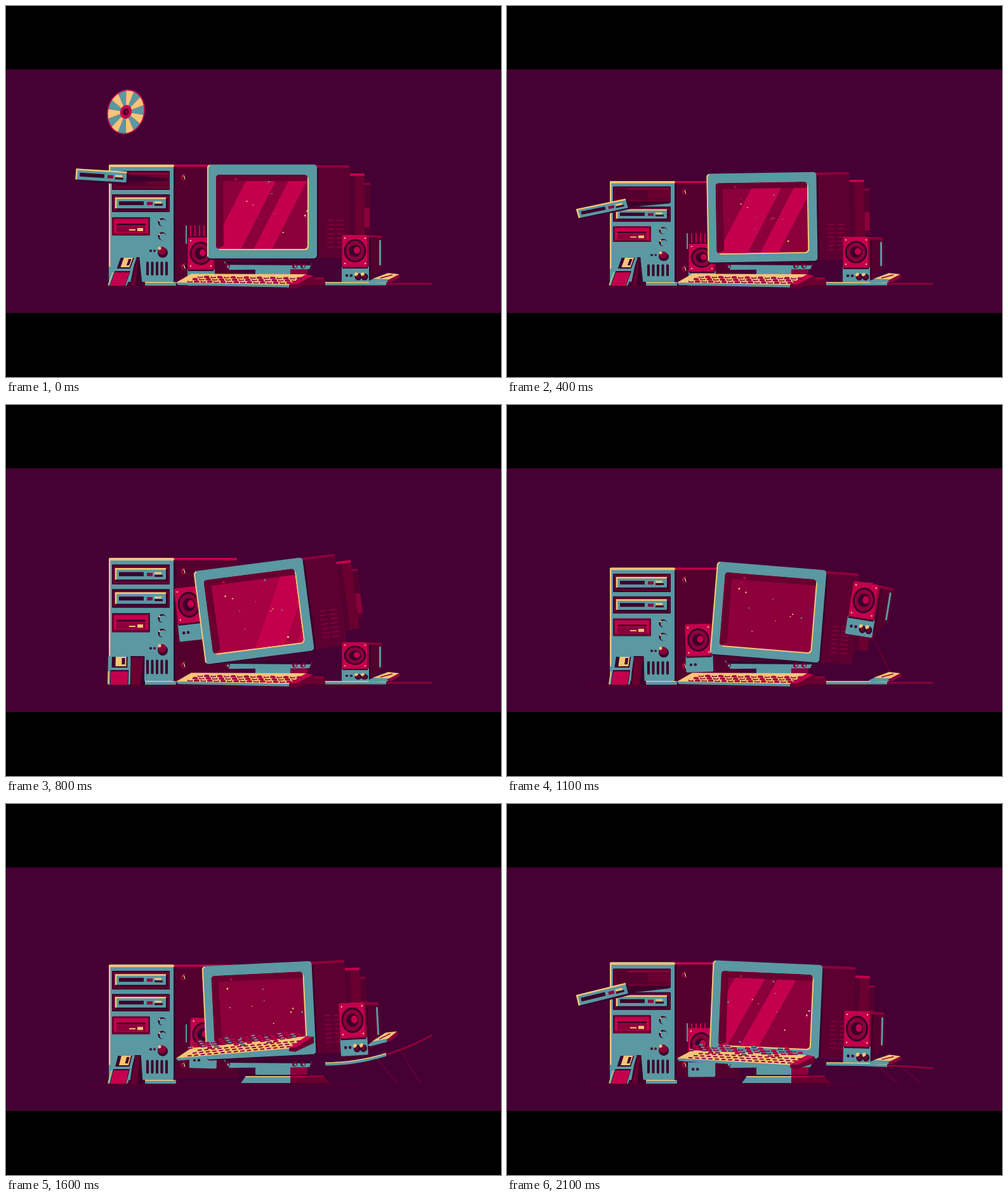
An HTML page with a canvas for the animation above (2.2 s loop, 780x585 px).

```html
<!DOCTYPE html>
<html lang="en">
<head>
<meta charset="utf-8">
<title>Bouncing retro computer</title>
<style>
html, body { margin: 0; width: 100%; height: 100%; overflow: hidden; background: #000; }
canvas { display: block; filter: blur(.6px); }
</style>
</head>
<body>
<canvas id="stage" width="780" height="585"></canvas>
<script>
const ctx = document.getElementById('stage').getContext('2d');
const LOOP = 22, STEP = 100, IMPACT = 2.43;
const BG = '#450034', TEAL = '#5a98a2', CREAM = '#f8c477', RED = '#c4004c',
      CRIMSON = '#8b003a', WINE = '#69002f', SHADE = '#54002f', INK = '#3a002b';

// ---- motion rules; f counts steps of 100 ms ----
function smooth(f, a, b) {
  const u = Math.min(1, Math.max(0, (f - a) / (b - a)));
  return u * u * (3 - 2 * u);
}

// The disc drops on the tray and the tower rings like a spring.
function bounce(f) {
  return f < IMPACT ? 0 : 26 * Math.exp(-.16 * (f - 4)) * Math.cos(f - 4);
}

// The monitor rocks faster as the swing dies out; degrees.
function rock(f) {
  const x = f - 10;
  return 11 * smooth(f, 3, 11) * Math.exp(-.13 * x) * Math.sin(.479 * x + .024 * x * x);
}

// Three ballistic hops, each shorter and lower than the last.
function hop(f, start, span, height) {
  for (let n = 0; n < 3; n++) {
    const u = (f - start) / span;
    if (u >= 0 && u < 1) return { n, arc: 4 * u * (1 - u), height };
    start += span; span *= .84; height *= .6;
  }
  return null;
}

function speakerPose(f, { x, floor, start, span, height, drift, spin }) {
  const h = hop(f, start, span, height);
  const sy = h ? .95 + .16 * h.arc : f < start ? 1 - .18 * smooth(f, 2, start) : 1;
  const up = h ? h.arc * h.height : 0;
  const side = h ? up * drift * (-.6) ** h.n : 0;
  return { x: x + side, y: floor - up - 50 * sy, turn: side * spin, sy, up };
}

// A flat thing is thrown up with its right end first, then levels out.
function toss(f, start, height, tilt, rate) {
  const rise = smooth(f, start, start + 2);
  return { rise, up: height * rise, tilt: rise * (rate * (f - start - 2) - tilt) };
}

function trayPose(f) {
  const u = Math.max(0, (f - 4) / 4);
  const out = f < 8 ? 1 - u * u : smooth(f, 17, 20.5);
  const turn = out * (.06 - .3 * smooth(f, IMPACT, 4));
  return { out, x: 212 - 62 * out, y: 274.5 - 110 * turn, turn };
}

const LEFT = { x: 307, floor: 440, start: 5, span: 6.5, height: 70, drift: -.27, spin: .006 };
const RIGHT = { x: 550, floor: 436, start: 8.5, span: 5.8, height: 74, drift: .17, spin: .013 };

// ---- drawing helpers ----
function path(p) {
  ctx.beginPath();
  for (let i = 0; i < p.length; i += 2) ctx.lineTo(p[i], p[i + 1]);
}
function poly(color, ...p) { path(p); ctx.closePath(); ctx.fillStyle = color; ctx.fill(); }
function line(color, w, ...p) { path(p); ctx.strokeStyle = color; ctx.lineWidth = w; ctx.stroke(); }
function box(color, x, y, w, h, r = 0) {
  ctx.beginPath(); ctx.roundRect(x, y, w, h, r); ctx.fillStyle = color; ctx.fill();
}
function oval(color, x, y, rx, ry = rx) {
  ctx.beginPath(); ctx.ellipse(x, y, rx, ry, 0, 0, 7); ctx.fillStyle = color; ctx.fill();
}
function group(draw) { ctx.save(); draw(); ctx.restore(); }

// ---- parts ----
function drivePanel(x, y, turn) {
  group(() => {
    ctx.translate(x, y);
    ctx.rotate(turn);
    box(INK, -39, -7, 82, 18, 1);
    box(TEAL, -40, -9, 80, 17, 1);
    line(CREAM, 2.5, -39, 8, -39, -8, 40, -8);
    box(INK, -34, -3, 39, 6);
    box(CRIMSON, 10, -2, 9, 5);
    box(CREAM, 22, -3, 11, 3);
    box(INK, 22, 1, 13, 3);
  });
}

function screw(x, y) {
  oval(RED, x, y, 5);
  oval(INK, x + 1, y, 4);
  line(CREAM, 1.5, x - 1, y - 3, x + 1, y + 3);
}

function bay(y, h) {
  box(INK, 167, y, 91, h, 1);
  box(WINE, 169, y + 2, 88, h - 4);
}

function tower(f) {
  group(() => {
    ctx.translate(0, 433);
    ctx.scale(1, 1 - bounce(f) / 183);
    ctx.translate(0, -433);
    poly(SHADE, 264, 250, 362, 250, 366, 255, 366, 433, 264, 433);
    box(RED, 264, 250, 100, 3.5, 1);
    box(INK, 264, 256, 3, 177);
    screw(281, 270);
    screw(281, 411);
    for (let x = 284; x < 315; x += 7) line(x > 284 ? RED : TEAL, 2, x, 346, x, x > 284 ? 363 : 375);

    box(TEAL, 162, 250, 102, 185, 2);
    box(CREAM, 162, 250, 103, 4, 2);
    box(CREAM, 162, 251, 2.5, 160);
    bay(260, 30);
    bay(297, 28);

    const t = trayPose(f);
    if (t.out > .05) {
      const x = t.x + 38, y = t.y + 38 * t.turn, deep = 275 - 50 * t.turn;
      box(SHADE, 171, 264, 84, 20);
      box(CRIMSON, 190, 263, 66, 3);
      box(WINE, 222, 267, 34, 15);
      poly(INK, x, y - 4, 256, deep, 256, deep + 4, x, y + 7);
    }
    drivePanel(212, 311, 0);
    drivePanel(t.x, t.y, t.turn);

    box(WINE, 167, 333, 60, 29, 1);
    box(RED, 170, 336, 54, 22, 1);
    box(INK, 174, 343, 46, 3);
    box(CRIMSON, 174, 347, 46, 10);
    box(CREAM, 194, 352, 10, 2);
    box(CREAM, 207, 350, 9, 5);
    for (const y of [341, 363]) {
      oval(INK, 246, y, 6.5);
      oval(TEAL, 247.5, y + 1, 5.5);
      oval(CREAM, 242, y - 3, 1.5);
    }
    oval(INK, 228, 386, 2);
    oval(WINE, 234, 386, 2);
    oval(INK, 247, 389, 8);
    oval(CRIMSON, 246, 386, 6.5);
    oval(CREAM, 242, 382, 2.5);
    for (let i = 0; i < 5; i++) box(INK, 221 + i * 7.5, 403, 4, 22, 2);
  });
  box(TEAL, 219, 435, 49, 6, 1);
  box(CREAM, 219, 435, 46, 1.5);
}

function floppy(f) {
  const k = 16 - 15 * smooth(f, 4.5, 8) * Math.exp(-.15 * Math.max(0, f - 8));
  const top = 396, low = 441, end = 195 + .65 * k;
  poly(INK, end - 1, top, 219 - .55 * k, top, 218 - .2 * k, low, 195, low);
  poly(WINE, end + 2, top + 2, 217 - .55 * k, top + 2, 212 - .5 * k, low, 197, low);
  group(() => {
    ctx.transform((end - 160 - k) / 35, 0, -k / 45, 1, 160 + k, top);
    box(TEAL, 0, 0, 36, 45, 2);
    line(CREAM, 1.5, 1, 44, 1, 24);
    box(INK, 6, 1, 25, 17);
    box(CREAM, 12, 1, 17, 15);
    box(INK, 22, 3, 5, 10);
    box(INK, 4, 22, 29, 23);
    box(RED, 5, 24, 27, 21);
  });
}

function speaker(s, full) {
  group(() => {
    ctx.translate(s.x, s.y);
    ctx.rotate(s.turn);
    ctx.scale(1, s.sy);
    if (full) {
      poly(SHADE, 18, -24, 41, -23, 44, -18, 44, 25, 20, 50);
      poly(CRIMSON, 18, -25, 41, -24, 44, -20, 20, -21);
      box(TEAL, 38, -17, 3, 40, 1);
      poly(INK, 20, -20, 25, -20, 25, 43, 20, 45);
    }
    box(TEAL, -21, 24, 43, 27, 2);
    box(INK, -20, 24, 40, 4);
    for (const x of [-13, -6]) oval(INK, x, 39, 2.2);
    for (const x of full ? [4, 14] : []) {
      oval(INK, x + 1, 41, 5.5);
      oval(CREAM, x - 2, 37, 3);
      oval(WINE, x + 1, 41, 3);
    }
    box(CRIMSON, -21, -25, 43, 51, 3);
    box(RED, -20, -25, 39, 50, 3);
    oval(INK, 0, 0, 17.5, 18.5);
    oval(CRIMSON, 0, 0, 14.5, 15.5);
    oval(INK, 0, 0, 9.5);
    oval(RED, 3, -1, 5, 5.5);
    for (const x of [-16, 16]) for (const y of [-20, 20]) oval(CREAM, x, y, 1.2);
  });
}

function stand() {
  poly(WINE, 448, 429, 499, 429, 511, 440, 448, 440);
  poly(TEAL, 378, 429, 448, 429, 448, 440, 370, 440);
  line(CREAM, 1.5, 377, 430, 448, 430);
  line(RED, 1.5, 448, 430, 500, 430);
  box(TEAL, 393, 412, 55, 15, 1);
  box(CRIMSON, 448, 412, 27, 15);
  poly(TEAL, 343, 403, 482, 405, 478, 415, 352, 416);
  poly(INK, 345, 403, 482, 404, 480, 409, 347, 408);
  for (const x of [349, 455, 468]) { oval(WINE, x, 410, 4); oval(TEAL, x + 1, 411, 2); }
}

function random(seed) {
  const v = Math.sin(seed * 127.1 + 3.7) * 43758.5453;
  return v - Math.floor(v);
}

function stars(f) {
  for (let i = 0; i < 15; i++) {
    const a = random(i) * 6.283, u = (random(i + 40) + f / LOOP) % 1;
    const r = 12 + 65 * u;
    oval(i % 3 ? (i % 2 ? TEAL : RED) : CREAM, 88 + Math.cos(a) * r, 76 + Math.sin(a) * r * .8, .7 + u * .9);
  }
}

// The reflection slides against the tilt and fades during the big swings.
function reflection(f) {
  const g = -10 * rock(f);
  ctx.globalAlpha = .5 * Math.exp(-((f - 8) ** 2) / 3);
  box(RED, 14, 16, 146, 118);
  ctx.globalAlpha = 1 - smooth(f, 8, 10.5) + smooth(f, 16.5, 20);
  for (const [x, w] of [[66, 47], [133, 29]])
    poly(RED, x + g, 16, x + w + g, 16, x + w - 60 + g, 134, x - 60 + g, 134);
  ctx.globalAlpha = 1;
}

function monitor(f) {
  const turn = rock(f), dent = Math.max(0, bounce(f));
  group(() => {
    ctx.translate(403.5 + .45 * turn, 398 + .2 * dent);
    ctx.rotate(turn * Math.PI / 180);
    ctx.scale(1, 1 - dent / 490);
    ctx.translate(-86.5, -148);
    box(SHADE, 245, 29, 12, 78);
    box(CRIMSON, 247, 29, 10, 3);
    box(CRIMSON, 248, 68, 8, 31);
    box(WINE, 224, 15, 24, 108, 2);
    box(RED, 224, 14, 24, 4, 1);
    box(SHADE, 224, 18, 9, 104);
    box('#5c0031', 168, 1, 57, 146, 3);
    box(CRIMSON, 168, 1, 57, 4, 2);
    box(INK, 170, 6, 6, 140);
    for (let y = 88; y < 132; y += 7) {
      line(CRIMSON, 1.7, 189, y, 200, y);
      line(CRIMSON, 1.7, 204, y, 216, y);
    }
    box(INK, 1, 3, 173, 147, 5);
    box(TEAL, 0, 0, 173, 148, 5);
    line(CREAM, 2, 1, 145, 1, 4, 4, 1);
    box(CREAM, 16, 18, 144, 117, 6);
    ctx.beginPath();
    ctx.roundRect(14, 16, 144, 117, 5);
    ctx.clip();
    box(CRIMSON, 14, 16, 146, 118);
    reflection(f);
    stars(f);
    box(WINE, 14, 16, 145, 10);
    poly(WINE, 14, 16, 25, 26, 26, 128, 14, 134);
    oval(RED, 45, 23, 2);
  });
}

function mousePad(f) {
  const p = toss(f, 14, 28, .27, .062);
  const bend = x => p.tilt * x * x / 168;
  const strip = (color, w, from, to, dy) => {
    const pts = [];
    for (let x = from; x <= to; x += 12) pts.push(x, bend(x) + dy);
    line(color, w, ...pts);
  };
  group(() => {
    ctx.translate(503, 438 - p.up);
    if (p.rise > .1) {
      line(WINE, 1.8, 82, bend(82) + 3, 113, p.up + 2);
      line(WINE, 1.8, 120, bend(120) + 3, 150, p.up + 3);
    }
    strip(CRIMSON, 3, 96, 168, 0);
    strip(TEAL, 5, 0, 100, 0);
    strip(CREAM, 1.5, 0, 100, -2);

    const h = hop(f, 14, 6, 20);
    ctx.translate(92, bend(92) - (h && !h.n ? h.arc * h.height : 0));
    ctx.rotate(p.tilt * .8);
    poly(TEAL, -25, -4, -9, -11, 15, -9, 5, -2, -22, -1);
    poly(CREAM, -17, -8, 7, -17, 25, -15, 10, -7);
    poly(CRIMSON, 5, -5, 25, -15, 26, -10, 11, -2);
    line(CRIMSON, 1.5, -5, -9, 14, -14);
  });
}

function eachKey(draw) {
  for (let row = 2; row >= 0; row--)
    for (let i = 0; i < 16; i++) draw(18 + row * 8 + i * 10.4, -4 - row * 3.7, i + row);
}

function keyboard(f) {
  const k = toss(f, 12, 35, .165, .029);
  group(() => {
    ctx.transform(1, .015 + k.tilt, 0, 1, 268, 437 - k.up);
    poly(TEAL, 0, -1, 178, -2, 178, 4, 3, 3);
    poly(CREAM, 0, -1, 24, -15, 206, -17, 178, 0);
    poly(WINE, 178, 0, 205, -17, 217, -15, 217, -5, 188, 6, 178, 4);
    poly(RED, 178, -1, 205, -17, 215, -15, 190, -1);
    eachKey((x, y) => box(CRIMSON, x, y, 6.5, 2));
    eachKey((x, y, n) => {
      const h = k.rise * (12 + 2.5 * Math.sin(n * 1.4));
      box(CRIMSON, x, y - h, 8, 2.5);
      box(n % 2 ? RED : k.rise > .5 ? TEAL : CREAM, x + 1, y - h - 1, 6, 2);
    });
  });
}

function disc(f) {
  if (f >= IMPACT) return;
  group(() => {
    ctx.translate(189, 167 + 18 * f * f);
    ctx.rotate(.28 + f * .2);
    ctx.scale(.82, 1 - f * .2);
    oval(RED, 0, 0, 36);
    for (let i = 0; i < 14; i++) {
      ctx.beginPath();
      ctx.moveTo(0, 0);
      ctx.arc(0, 0, 34, i * Math.PI / 7 - .1, (i + 1) * Math.PI / 7 - .1);
      ctx.fillStyle = i % 2 ? TEAL : CREAM;
      ctx.fill();
    }
    oval(RED, 0, 0, 11);
    oval(INK, 0, 0, 5.5);
    oval(CRIMSON, 1, 0, 2.5);
  });
}

function render(f) {
  box('#000', 0, 0, 780, 585);
  box(BG, 0, 100, 780, 384);
  box('#4d0030', 128, 441, 432, 5, 2);
  tower(f);
  floppy(f);
  speaker(speakerPose(f, LEFT), false);
  stand();
  monitor(f);
  const right = speakerPose(f, RIGHT);
  if (right.up > 45) line(WINE, 2, right.x + 18, right.y + 66, 603, 421);
  speaker(right, true);
  mousePad(f);
  box(CRIMSON, 478, 428, 23, 3);
  keyboard(f);
  disc(f);
}

function tick() {
  render(Math.floor(performance.now() / STEP) % LOOP);
  requestAnimationFrame(tick);
}
tick();
</script>
</body>
</html>
```
